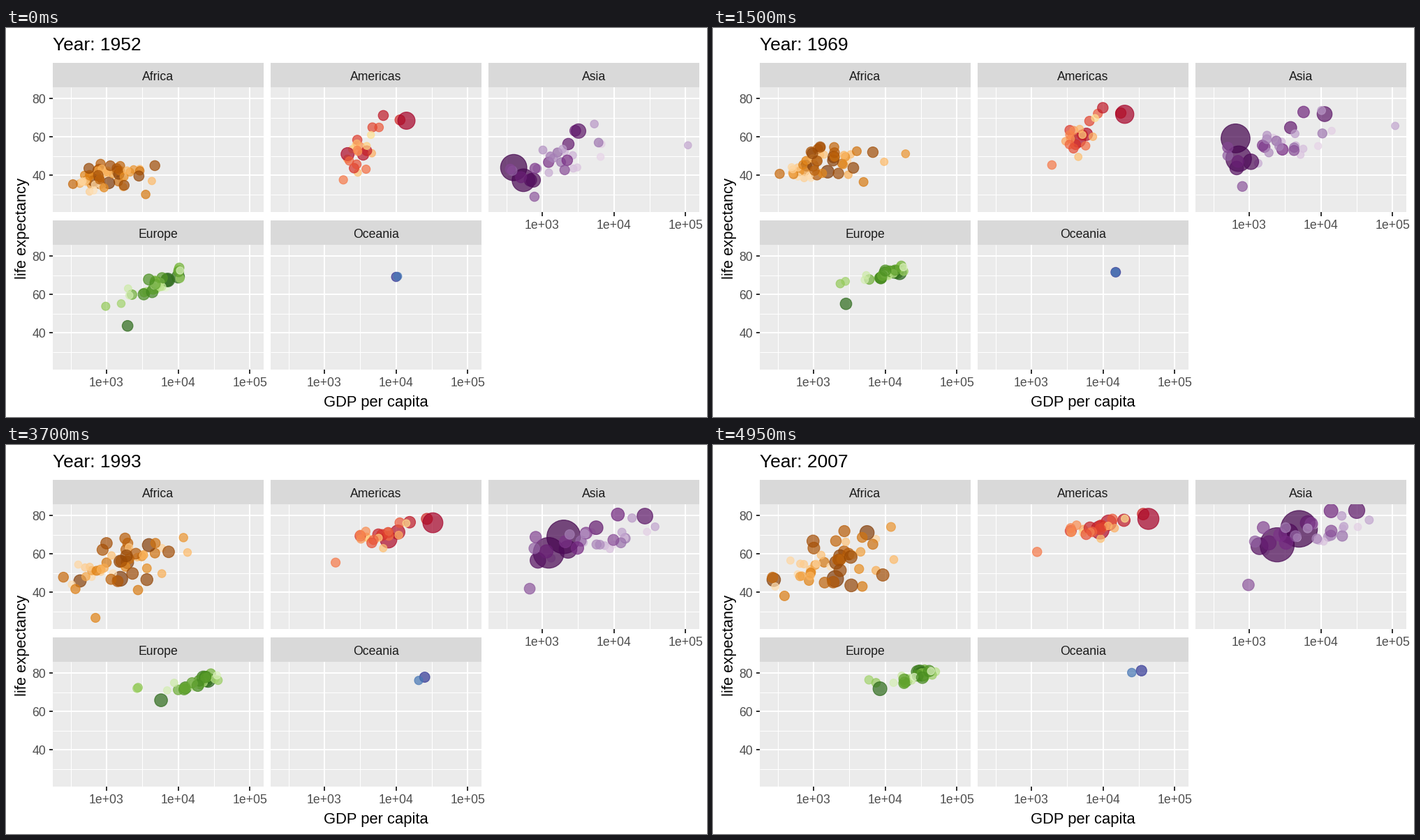
These frames come from a looping animation (1004 px wide and 558 px high, 5000 ms). A matplotlib script:

```python
import numpy as np
import matplotlib.pyplot as plt
from matplotlib.animation import FuncAnimation
from matplotlib.colors import LinearSegmentedColormap
from matplotlib.patches import Rectangle

WIDTH, HEIGHT, DPI = 1004, 558, 144
FRAMES, INTERVAL = 100, 50
FIRST, LAST = 1952, 2007
PANEL_W, PANEL_H, STRIP_H = 301.5, 179, 35
DECADE, YEAR_OF_LIFE = 102.6, 2.755

plt.rcParams["font.family"] = "Liberation Sans"
fig = plt.figure(figsize=(WIDTH / DPI, HEIGHT / DPI), dpi=DPI, facecolor="white")
ax = fig.add_axes([0, 0, 1, 1])
ax.set(xlim=(0, WIDTH), ylim=(HEIGHT, 0))
ax.axis("off")


def box(x, y, w, h, color):
    return ax.add_patch(Rectangle((x, y), w, h, fc=color, lw=0, zorder=1))


def line(xs, ys, px, color="white"):
    ax.plot(xs, ys, color=color, lw=px * 72 / DPI, solid_capstyle="butt", zorder=2)


def label(x, y, text, size=8.8, color="#4d4d4d", ha="center", **kw):
    return ax.text(x, y, text, size=size, color=color, ha=ha, va="baseline", **kw)


class Crowd:
    """Countries scattered around a drifting centre, each wandering slowly.

    trend holds (year, log GDP, its spread, life, its spread) key points;
    link is the correlation of life with GDP; lean makes small countries richer.
    """

    def __init__(self, count, biggest, growth, link, trend, lean=0.0, seed=1):
        rng = np.random.default_rng(seed)
        rank = rng.permutation(np.linspace(0, 1, count))
        self.last = biggest * (1 - rank) ** 3 + 0.3
        self.first = self.last / growth
        self.trend = np.array(trend).T
        self.link = link
        self.tilt = lean * (rank - 0.5)
        self.traits = np.clip(rng.normal(size=(2, 2, count)), -1.9, 1.9)

    def at(self, year):
        years, *curves = self.trend
        log_gdp, gdp_spread, life, life_spread = (np.interp(year, years, c) for c in curves)
        turn = 0.9 * (year - FIRST) / (LAST - FIRST)
        wealth, health = self.traits[0] * np.cos(turn) + self.traits[1] * np.sin(turn)
        wealth = np.clip(wealth + self.tilt, -1.9, 1.9)
        health = self.link * wealth + np.sqrt(1 - self.link ** 2) * health
        return log_gdp + gdp_spread * wealth, life + life_spread * health


class Region:
    def __init__(self, title, left, top, ramp, crowd=None):
        self.left, self.top, self.crowd = left, top, crowd
        self.ramp = LinearSegmentedColormap.from_list(title, ramp)
        self.pops, self.paths = [], []
        box(left, top - STRIP_H, PANEL_W, STRIP_H, "#d9d9d9")
        self.panel = box(left, top, PANEL_W, PANEL_H, "#ebebeb")
        label(left + PANEL_W / 2, top - 10, title, color="#1a1a1a")
        for life in (30, 50, 70, 40, 60, 80):
            line((left, left + PANEL_W), [self.y(life)] * 2, 1 if life % 20 else 2)
        for exp in (2.5, 3.5, 4.5, 3, 4, 5):
            line([self.x(exp)] * 2, (top, top + PANEL_H), 1 if exp % 1 else 2)

    def x(self, log_gdp):
        return self.left + 77 + DECADE * (log_gdp - 3)

    def y(self, life):
        return self.top + 16 + YEAR_OF_LIFE * (80 - life)

    def x_axis(self):
        bottom = self.top + PANEL_H
        for exp in (3, 4, 5):
            line([self.x(exp)] * 2, (bottom, bottom + 5.5), 2, "#333333")
            label(self.x(exp), bottom + 24.5, f"1e+0{exp}")

    def y_axis(self):
        for life in (40, 60, 80):
            line((self.left - 5.5, self.left), [self.y(life)] * 2, 2, "#333333")
            label(self.left - 10, self.y(life) + 7, life, ha="right")

    def country(self, pop_first, pop_last, *points):
        """A country that stands out: populations in millions, (year, GDP, life) points."""
        years, gdp, life = np.array(points, float).T
        self.pops.append((pop_first, pop_last))
        self.paths.append((years, np.log10(gdp), life))

    def place(self, year):
        first, last = np.array(self.pops).T
        spots = np.array([(np.interp(year, t, g), np.interp(year, t, e))
                          for t, g, e in self.paths]).T
        if self.crowd:
            # A sixth of the crowd lies beneath the outstanding countries.
            cut = len(self.crowd.last) // 6

            def merge(many, few):
                return np.concatenate([many[:cut], few, many[cut:]])

            first, last = merge(self.crowd.first, first), merge(self.crowd.last, last)
            spots = [merge(m, f) for m, f in zip(self.crowd.at(year), spots)]
        pop = first * (last / first) ** ((year - FIRST) / (LAST - FIRST))
        size = 2 + 10 * np.sqrt(np.clip((pop - 0.06) / 1318.6, 0, 1))
        diameter = 0.75 * (size * 2.845 + 0.945)
        return self.x(spots[0]), self.y(spots[1]), diameter ** 2, last

    def start(self):
        x, y, areas, last = self.place(FIRST)
        # The most populous country gets the darkest shade.
        shade = np.argsort(np.argsort(-last)) / (len(last) - 1)
        self.dots = ax.scatter(x, y, s=areas, c=self.ramp(shade), alpha=0.7,
                               linewidths=0.6, zorder=3)
        self.dots.set_clip_path(self.panel)

    def update(self, year):
        x, y, areas, _ = self.place(year)
        self.dots.set_offsets(np.column_stack([x, y]))
        self.dots.set_sizes(areas, DPI)


africa = Region(
    "Africa", 67, 85, ["#7f3b08", "#b35806", "#e08214", "#fdb863", "#fee0b6"],
    Crowd(44, 60, 3.3, 0.5, [(1952, 2.97, 0.26, 39, 4.5), (1962, 3.03, 0.27, 43, 5.5),
                             (1977, 3.11, 0.3, 49.5, 6.5), (1992, 3.08, 0.36, 54, 7.5),
                             (2007, 3.15, 0.38, 54.5, 8.5)], seed=4))
africa.country(33, 135, (1952, 1077, 36), (1972, 1698, 43), (1987, 1385, 47), (2007, 2014, 47))
africa.country(22, 80, (1952, 1419, 42), (1972, 2024, 51), (1992, 3794, 64), (2007, 5581, 71))
africa.country(14, 65, (1952, 781, 39), (1977, 796, 48), (1992, 458, 46), (2002, 241, 45), (2007, 278, 46.5))
africa.country(14, 44, (1952, 4725, 45), (1977, 8028, 55.5), (1992, 7225, 62), (2007, 9270, 49))
africa.country(4.2, 12, (1952, 3521, 30), (1967, 5523, 36), (1977, 3009, 39), (1992, 2628, 41), (2007, 4797, 43))
africa.country(1, 6, (1952, 2388, 43), (1967, 18773, 50), (1977, 21951, 57), (1987, 11771, 66), (2007, 12057, 74))
africa.country(0.4, 1.5, (1952, 4293, 37), (1972, 11402, 49), (1977, 21746, 53), (1992, 13522, 61), (2007, 13206, 57))
africa.country(2.5, 9, (1952, 493, 40), (1987, 848, 44), (1992, 737, 24), (1997, 590, 36), (2007, 863, 46))

americas = Region(
    "Americas", 379, 85, ["#a50026", "#d73027", "#f46d43", "#fdae61", "#fee090"],
    Crowd(20, 44, 3, 0.6, [(1952, 3.5, 0.17, 53, 8), (1962, 3.59, 0.17, 58, 7.5),
                           (1977, 3.76, 0.18, 65, 6), (1992, 3.78, 0.21, 69.8, 4),
                           (2007, 3.91, 0.22, 73.5, 3.2)], seed=3))
americas.country(15, 33, (1952, 11367, 68.8), (1977, 22091, 74.2), (1992, 26343, 78), (2007, 36319, 80.7))
americas.country(158, 301, (1952, 13990, 68.4), (1977, 24073, 73.4), (1992, 32004, 76), (2007, 42952, 78.2))
americas.country(57, 190, (1952, 2109, 51), (1962, 3337, 55.7), (1977, 6660, 61.5), (2007, 9066, 72.4))
americas.country(30, 109, (1952, 3478, 50.8), (1962, 4582, 58.3), (1982, 9611, 67.4), (2007, 11978, 76.2))
americas.country(3.2, 8.5, (1952, 1840, 37.6), (1982, 2011, 51.5), (1992, 1456, 55), (2007, 1202, 61))

asia = Region(
    "Asia", 691, 85, ["#40004b", "#762a83", "#9970ab", "#c2a5cf", "#e7d4e8"],
    Crowd(26, 90, 3, 0.7, [(1952, 3.2, 0.34, 48, 8), (1962, 3.32, 0.36, 53, 8),
                           (1977, 3.58, 0.42, 61, 7), (1992, 3.71, 0.44, 68, 5.5),
                           (2007, 3.88, 0.42, 72, 5)], lean=1.2, seed=6))
asia.country(8.4, 32, (1952, 779, 28.8), (1962, 853, 32), (1992, 649, 41.7), (2007, 975, 43.8))
asia.country(556, 1319, (1952, 400, 44), (1962, 488, 44.5), (1967, 613, 58.4), (1982, 962, 65.5), (2007, 4959, 73))
asia.country(372, 1110, (1952, 547, 37.4), (1977, 813, 54.2), (1992, 1164, 60.2), (2007, 2452, 64.7))
asia.country(82, 224, (1952, 750, 37.5), (1962, 849, 42.5), (1977, 1383, 52.7), (2007, 3541, 70.6))
asia.country(86, 127, (1952, 3217, 63), (1962, 6577, 68.7), (1972, 14779, 73.4), (1992, 26825, 79.4), (2007, 31656, 82.6))
asia.country(47, 150, (1952, 684, 37.5), (1977, 660, 46.9), (1992, 838, 56), (2007, 1391, 64))
asia.country(0.2, 2.5, (1952, 108382, 55.6), (1972, 109348, 67.7), (1982, 31354, 71.3), (2007, 47307, 77.6))

europe = Region(
    "Europe", 67, 311, ["#276419", "#4d9221", "#7fbc41", "#b8e186", "#e6f5d0"],
    Crowd(23, 40, 1.25, 0.85, [(1952, 3.7, 0.21, 65.5, 4), (1962, 3.89, 0.18, 69.5, 2.2),
                               (1977, 4.14, 0.13, 72, 1.7), (1992, 4.19, 0.23, 74.3, 2.6),
                               (2007, 4.38, 0.2, 77.7, 2.3)], seed=8))
europe.country(1.3, 3.6, (1952, 1601, 55.2), (1962, 2313, 65), (1977, 3533, 69), (1992, 2497, 71.6), (2007, 5937, 76.4))
europe.country(2.8, 4.6, (1952, 974, 53.8), (1962, 1710, 62), (1977, 3528, 70), (1992, 2547, 72.2), (2007, 7446, 74.9))
europe.country(42, 61, (1952, 7030, 67.4), (1977, 18293, 73.8), (2007, 30470, 80.7))
europe.country(69, 82, (1952, 7144, 67.5), (1962, 12902, 70.3), (1977, 20513, 72.5), (2007, 32170, 79.4))
europe.country(48, 58, (1952, 4931, 65.9), (1977, 14256, 73.5), (1992, 22014, 77.4), (2007, 28570, 80.5))
europe.country(22, 71, (1952, 1967, 43.6), (1962, 2323, 52.1), (1982, 4241, 61), (2007, 8458, 71.8))
europe.country(50, 61, (1952, 9980, 69.2), (1977, 17429, 72.8), (2007, 33203, 79.4))

oceania = Region("Oceania", 379, 311, ["#313695", "#4575b4"])
oceania.country(8.7, 20, (1952, 10040, 69.1), (1967, 14526, 71.1), (1987, 21889, 76.3), (2007, 34435, 81.2))
oceania.country(2, 4.1, (1952, 10557, 69.4), (1972, 16046, 71.9), (1987, 19007, 74.3), (2007, 25185, 80.2))

regions = africa, americas, asia, europe, oceania
for region in (asia, europe, oceania):
    region.x_axis()
for region in (africa, europe):
    region.y_axis()
for region in regions:
    region.start()

title = label(67, 32, "", 13.2, "black", "left")
label(529.5, 542.5, "GDP per capita", 11, "black")
label(28.5, 287.5, "life expectancy", 11, "black", rotation=90, rotation_mode="anchor")


def draw(frame):
    year = FIRST + (LAST - FIRST) * frame / (FRAMES - 1)
    title.set_text(f"Year: {round(year)}")
    for region in regions:
        region.update(year)


animation = FuncAnimation(fig, draw, frames=FRAMES, interval=INTERVAL,
                          init_func=lambda: draw(0), repeat=True, repeat_delay=0)
plt.show()
```
